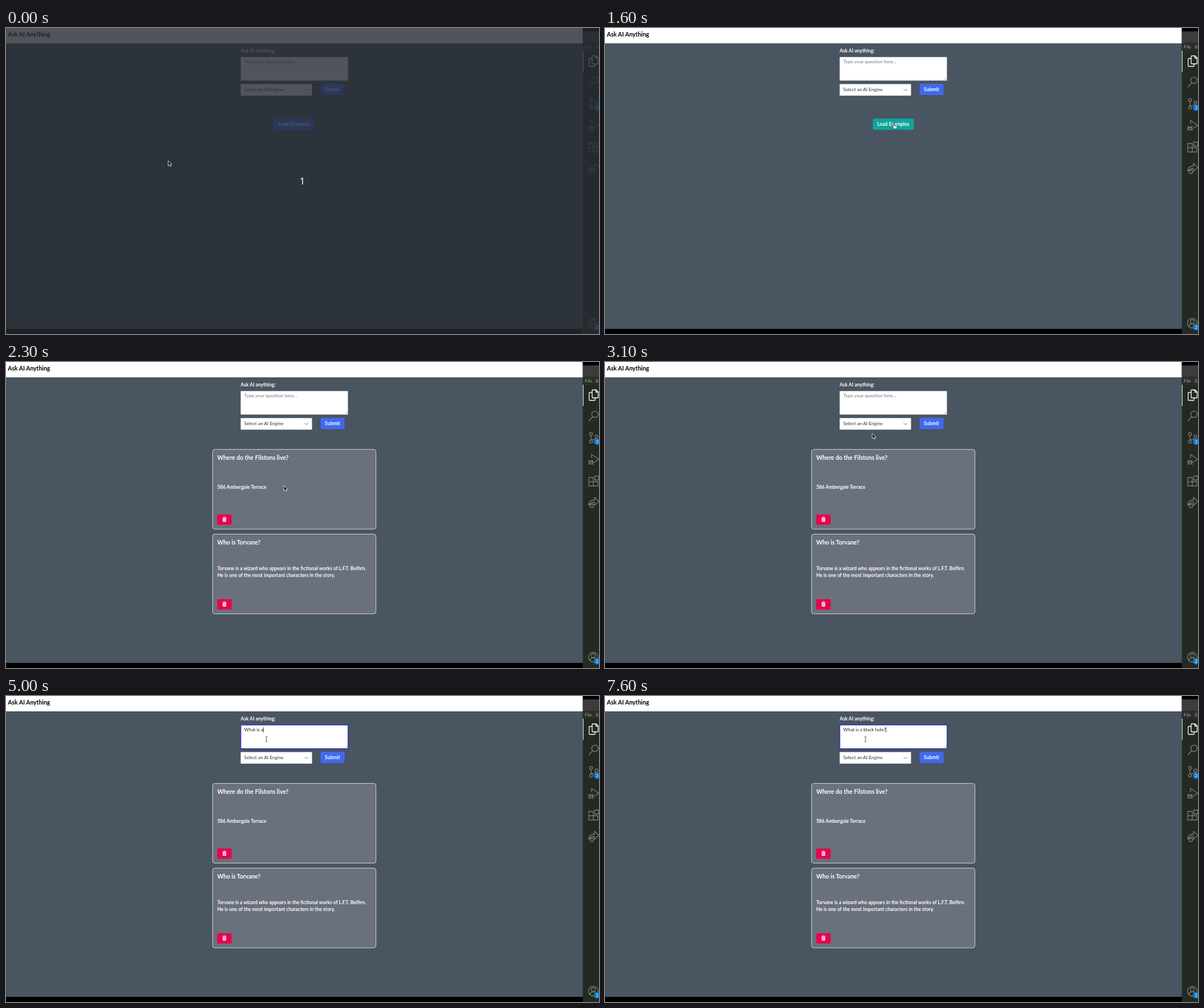
An HTML page that plays this animation: 1040x538 px, repeating every 8000 ms.

```html
<!DOCTYPE html>
<html lang="en">
<head>
<meta charset="utf-8">
<title>Ask AI Anything</title>
<style>
  html, body { margin: 0; width: 100%; height: 100%; overflow: hidden; background: #000; }
  svg { display: block; width: 1040px; height: 538px; }
  text { font: 8.25px Lato, "Open Sans", sans-serif; white-space: pre; }
  .bold { font-weight: 700; font-size: 8.45px; fill: #fff; }
  .title { font-weight: 700; font-size: 10.4px; fill: #fff; }
  .mid { text-anchor: middle; }
  .button { fill: #4169ef; }
  .button.hover { fill: #10a59c; }
  .icon { fill: none; stroke: #7b7e77; stroke-width: 1.3; stroke-linejoin: round; }
  .badge { fill: #0a7acb; }
  .badge-text { font-size: 7.5px; fill: #fff; text-anchor: middle; }
  .card { fill: #6a717d; stroke: #d3d7dc; stroke-width: 1; }
  .field { fill: #fff; stroke: #8b929b; stroke-width: .5; }
  .focus { fill: none; stroke: #352fb5; stroke-width: 1.5; }
  .typed { font-size: 8.1px; fill: #222; }
  .arrow { fill: #111; stroke: #fff; stroke-width: .8; stroke-linejoin: round; }
  .hand { fill: #fff; stroke: #111; stroke-width: .8; stroke-linejoin: round; }
  .beam { fill: none; stroke: #222; stroke-width: .8; }
  .count { font: 16.5px "Noto Sans", "Open Sans", sans-serif; fill: #fff; text-anchor: middle; }
</style>
</head>
<body>
<svg viewBox="0 0 1040 538">
  <defs>
    <g id="delete">
      <rect width="25.4" height="18.2" rx="2" fill="#e6054f"/>
      <path d="M9.2 5.9h7M11.5 5.5v-.7h2.4v.7" fill="none" stroke="#fff" stroke-width="1"/>
      <path d="M9.8 7h5.8v5q0 1-1 1h-3.8q-1 0-1-1z" fill="#fff"/>
      <path d="M11.4 8v4M12.7 8v4M14 8v4" stroke="#e6054f" stroke-width=".5"/>
    </g>
  </defs>

  <!-- Page -->
  <rect width="1012" height="529" fill="#495561"/>
  <rect width="1012" height="27" fill="#fff"/>
  <text class="title" x="3.2" y="14.8" style="fill:#000">Ask AI Anything</text>
  <text class="bold" x="411.5" y="43.2">Ask AI anything:</text>

  <rect class="field" x="411.5" y="51" width="188.3" height="41.5" rx="1"/>
  <path d="M594.8 91.3l4-4M597 91.3l1.8-1.8" stroke="#777" stroke-width=".6"/>
  <text id="placeholder" x="417.8" y="62.2" fill="#6b7280">Type your question here...</text>
  <g id="focus">
    <rect class="focus" x="411.7" y="50.8" width="188.4" height="41.9" rx="1"/>
    <text id="typed" class="typed" x="417.8" y="62.2"></text>
    <rect id="caret" y="55" width=".8" height="9" fill="#111"/>
  </g>

  <rect class="field" x="411.5" y="98.5" width="125.3" height="20.5" rx="1"/>
  <text x="417.8" y="111.2" fill="#2b2f36">Select an AI Engine</text>
  <path d="M523.8 107.2l3.1 3.1 3.1-3.1" fill="none" stroke="#6b7280" stroke-width="1"/>
  <rect class="button" x="551.8" y="98" width="42" height="19.8" rx="2"/>
  <text class="bold mid" x="572.6" y="110.6">Submit</text>

  <g id="loader">
    <rect id="load" class="button" x="469.8" y="159.3" width="71.8" height="19.6" rx="2"/>
    <text class="bold mid" x="505.5" y="171.6">Load Examples</text>
  </g>

  <g id="cards">
    <rect class="card" x="362.3" y="153.7" width="286.5" height="140.2" rx="4"/>
    <text class="title" x="370.4" y="172">Where do the Filstons live?</text>
    <text class="bold" x="370.4" y="223.2">586 Ambergale Terrace</text>
    <use href="#delete" x="370.4" y="268"/>
    <rect class="card" x="362.3" y="302.6" width="286.5" height="140.2" rx="4"/>
    <text class="title" x="370.4" y="321">Who is Torvane?</text>
    <text class="bold" x="370.4" y="366.4">Torvane is a wizard who appears in the fictional works of L.F.T. Belfirn.</text>
    <text class="bold" x="370.4" y="378.4">He is one of the most important characters in the story.</text>
    <use href="#delete" x="370.4" y="417"/>
  </g>

  <!-- Editor side bar -->
  <rect x="1011.6" width="28.4" height="538" fill="#242922"/>
  <rect x="1011.6" width="28.4" height="6" fill="#000"/>
  <rect x="1011.6" y="6" width="28.4" height="20" fill="#3b3c3b"/>
  <rect x="1011.6" y="26" width="28.4" height="14" fill="#2b2d29"/>
  <text x="1015" y="36.3" fill="#a5a7a3">File</text>
  <text x="1034.5" y="36.3" fill="#a5a7a3">Edit</text>
  <rect x="1011.8" y="40" width="1" height="37" fill="#fff"/>
  <path class="icon" style="stroke:#fff" d="M1029 49h6l3.5 3.5V62q0 1-1 1H1029q-1 0-1-1V50q0-1 1-1zM1034.5 49v4h4M1028 53.5h-4q-1.3 0-1.3 1.3v11.4q0 1.3 1.3 1.3h8q1.2 0 1.2-1.3V63"/>
  <g class="icon">
    <circle cx="1033" cy="92" r="5.7"/>
    <path d="M1029 96l-7 8"/>
    <circle cx="1026" cy="126.5" r="2.6"/>
    <circle cx="1035.5" cy="131" r="2.6"/>
    <circle cx="1026" cy="140" r="2.6"/>
    <path d="M1026 129v8.3M1035.5 133.6q0 2.6-4 2.6-5 0-5.5 1.5"/>
    <path d="M1027 169v-6.5l12.5 8.5-8 5.5"/>
    <circle cx="1026" cy="176.3" r="3"/>
    <path d="M1023.5 174l-2-1.5M1028.5 174l2-1.5M1023 176.5h-2M1029 176.5h2M1023.5 178.5l-2 2M1028.5 178.5l2 2M1023 175.5h6"/>
    <path d="M1022 203h8v15h-8zM1022 210.5h16v7.5h-8M1032.5 200.5h7v7h-7z"/>
    <path d="M1022 252c0-7 5-9 10-9v-5l8 7-8 7v-5c-4 0-7 1-10 5z"/>
    <circle cx="1027.5" cy="253" r="3"/>
    <circle cx="1030" cy="519" r="8.5"/>
    <circle cx="1030" cy="516.3" r="3.5"/>
    <path d="M1024 525q1-5 6-5t6 5"/>
  </g>
  <circle class="badge" cx="1036.5" cy="140.2" r="5.6"/>
  <text class="badge-text" x="1036.7" y="142.9">3</text>
  <circle class="badge" cx="1036.5" cy="526.2" r="5.6"/>
  <text class="badge-text" x="1036.7" y="528.9">2</text>

  <g id="countdown">
    <rect width="1040" height="538" fill="rgb(38,43,50)" fill-opacity=".8"/>
    <text class="count" x="519.8" y="275">1</text>
  </g>

  <g id="pointer">
    <path id="arrow" class="arrow" d="M.4.4v9l2.2-1.9 1.5 3 1.4-.7-1.4-2.9h2.9z"/>
    <path id="hand" class="hand" d="M-.9.9q.9-1 1.8 0v3.4l4 .8q1 .3.9 1.4l-.5 3.3H.2L-2.8 6q-.2-1.2.9-1l1 .8z"/>
    <path id="beam" class="beam" d="M-1.8-4.4h1.2l.6.6.6-.6h1.2M0-3.8v7.6M-1.8 4.4h1.2l.6-.6.6.6h1.2"/>
  </g>
</svg>

<script>
const LOOP = 8000, STEP = 100;
const CARDS_AT = 1800, FOCUS_AT = 3400, TYPING_AT = 3800;
const QUESTION = "What is a black hole?";

// [time, number of characters typed]
const typing = [
  [3800, 1], [4000, 2], [4100, 3], [4200, 4], [4600, 7], [4800, 8], [5000, 9],
  [5400, 10], [5800, 11], [5900, 12], [6200, 13], [6400, 14], [6700, 16],
  [6900, 17], [7200, 19], [7400, 20], [7600, 21]
];

// [time, x, y]
const path = [
  [0, 284, 233], [100, 284, 233], [200, 276, 225], [300, 276, 225],
  [400, 275, 224], [500, 275, 224], [600, 154, 130], [700, 373, 9],
  [800, 373, 9], [900, 346, 70], [1100, 365, 180], [1200, 400, 204],
  [1400, 470, 184], [1600, 506.5, 167.5], [1700, 506.5, 167.5],
  [1800, 506, 170], [2300, 487, 217], [2600, 484, 248],
  [3000, 474, 150], [3300, 456.8, 76], [LOOP, 456.8, 76]
];

const $ = id => document.getElementById(id);
const show = (id, on) => $(id).style.display = on ? "" : "none";
const inside = ([x, y], left, top, right, bottom) =>
  x >= left && x <= right && y >= top && y <= bottom;

function pointerAt(t) {
  const i = path.findIndex(p => p[0] > t);
  const [t0, x0, y0] = path[i - 1], [t1, x1, y1] = path[i];
  const k = (t - t0) / (t1 - t0);
  return [x0 + (x1 - x0) * k, y0 + (y1 - y0) * k];
}

function render(t) {
  const pos = pointerAt(t);
  const hover = t < CARDS_AT && inside(pos, 470, 159, 542, 179);
  const overField = inside(pos, 411, 51, 600, 93);

  show("countdown", t < 100);
  show("loader", t < CARDS_AT);
  show("cards", t >= CARDS_AT);
  show("placeholder", t < TYPING_AT);
  show("focus", t >= FOCUS_AT);
  $("load").classList.toggle("hover", hover);

  $("pointer").setAttribute("transform", `translate(${pos})`);
  show("hand", hover);
  show("beam", overField);
  show("arrow", !hover && !overField);

  const count = typing.reduce((n, [at, chars]) => t >= at ? chars : n, 0);
  $("typed").textContent = QUESTION.slice(0, count);
  const width = count ? $("typed").getComputedTextLength() : 0;
  $("caret").setAttribute("x", 417.8 + width);
}

const start = performance.now();
function tick() {
  const t = (performance.now() - start) % LOOP;
  render(Math.floor(t / STEP) * STEP);
  requestAnimationFrame(tick);
}
tick();
</script>
</body>
</html>
```
